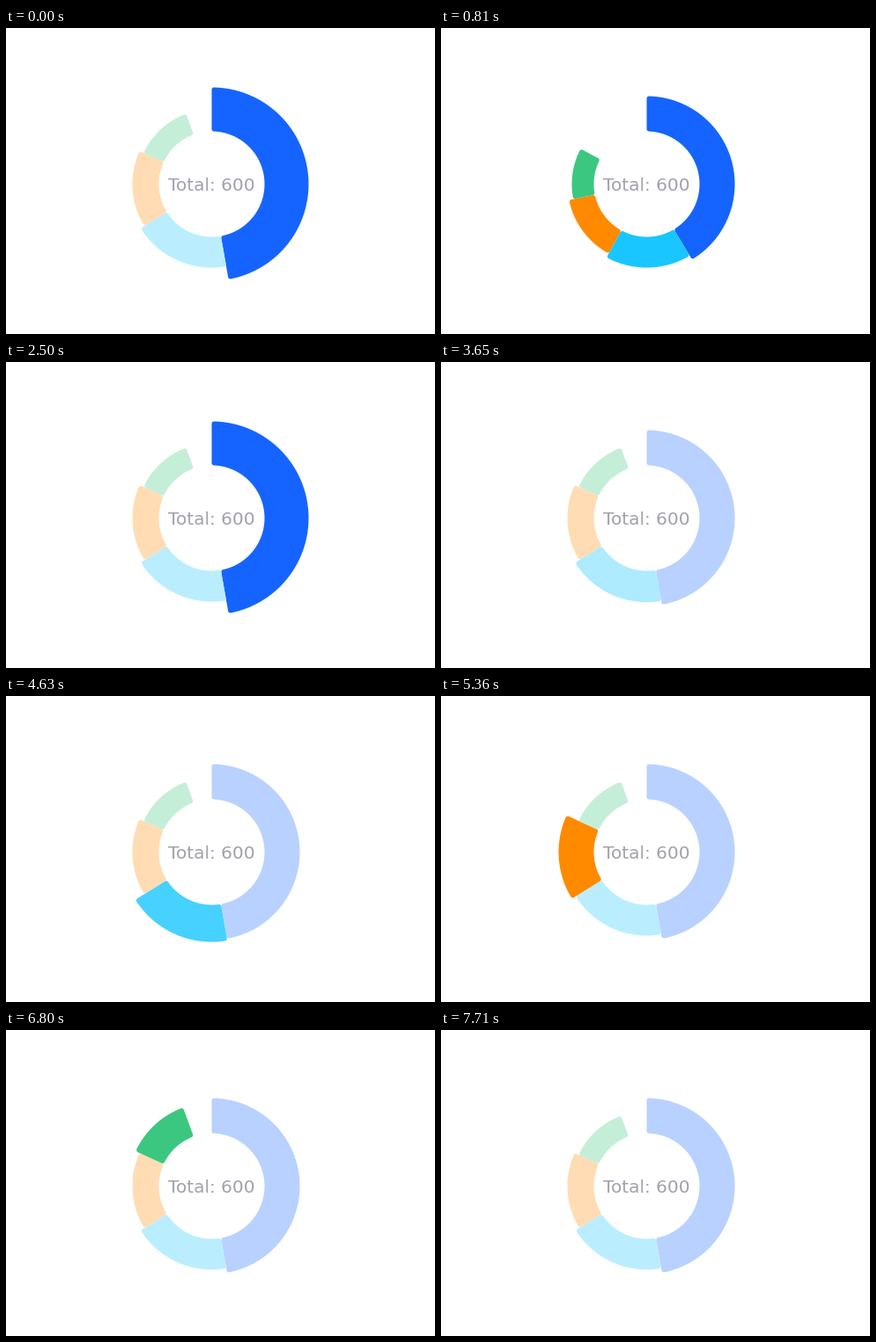
Animation, 487 px wide and 348 px high, one loop 7730 ms. Source, as a matplotlib script:

```python
import numpy as np
import matplotlib.pyplot as plt
from matplotlib.animation import FuncAnimation
from matplotlib.colors import to_rgb
from matplotlib.patches import Polygon

W, H, DPI = 487, 348, 64
LOOP, TICK = 7730, 10
PT = 72 / DPI                      # points per pixel

CX, CY, INNER, CORNER = 233.5, 177.5, 60, 2.5
SPAN, GROW, DIM = 340, 10, 0.3     # degrees, pixels, opacity at rest

CLEAR, TEXT_IN = 60, 300
SWEEP_START, SWEEP_TIME, SWEEP_SHOWN, SWEEP_TICK = 408, 800, 480, 55
FADE_MID, FADE_END = 1270, 1380

# value, outer radius, colour, (start, end, steps) of highlight in and out
SLICES = [
    (300, 100, "#1664FF", (2150, 2500, 7), (3140, 3420, 6)),
    (120, 95, "#1AC6FF", (3590, 3930, 7), (4520, 4850, 7)),
    (100, 90, "#FF8A00", (5020, 5360, 7), (5960, 6290, 7)),
    (80, 85, "#3CC780", (6460, 6800, 7), (7450, 7710, 6)),
]
TOTAL = sum(s[0] for s in SLICES)


def cubic_in_out(x):
    return 4 * x ** 3 if x < 0.5 else 1 - 4 * (1 - x) ** 3


def stepped(t, start, end, steps):
    """Eased progress that moves in a fixed number of visible steps."""
    if t < start:
        return 0.0
    if t >= end:
        return 1.0
    gap = (end - start) / (steps - 1)
    lead = 45
    elapsed = (t - start) // gap * gap + lead
    return cubic_in_out(elapsed / (end - start + lead))


def sweep(t):
    if t < CLEAR:
        return 1.0
    if t < SWEEP_SHOWN:
        return 0.0
    t = SWEEP_SHOWN + (t - SWEEP_SHOWN) // SWEEP_TICK * SWEEP_TICK
    x = min((t - SWEEP_START) / SWEEP_TIME, 1)
    return 1 - (1 - x) ** 3


def rest_opacity(t):
    if t < CLEAR or t >= FADE_END:
        return DIM
    return (1 + DIM) / 2 if t >= FADE_MID else 1.0


def ring_slice(a0, a1, outer):
    """Outline inset by the corner radius; the round stroke fills it out."""
    def arc(radius):
        pad = np.arcsin(CORNER / radius)
        a = np.linspace(np.radians(a0) + pad, np.radians(a1) - pad, 90)
        return np.column_stack([CX + radius * np.sin(a), CY - radius * np.cos(a)])
    return np.vstack([arc(outer - CORNER), arc(INNER + CORNER)[::-1]])


def on_white(color, opacity):
    return tuple(1 - opacity * (1 - c) for c in to_rgb(color))


fig = plt.figure(figsize=(W / DPI, H / DPI), dpi=DPI, facecolor="white")
ax = fig.add_axes([0, 0, 1, 1])
ax.set_xlim(0, W)
ax.set_ylim(H, 0)
ax.axis("off")

patches = []
for _ in SLICES:
    patch = Polygon([(0, 0), (1, 0), (0, 1)], closed=True, joinstyle="round",
                    linewidth=2 * CORNER * PT, snap=False)
    patches.append(ax.add_patch(patch))

label = ax.text(CX, 185, f"Total: {TOTAL}", ha="center", va="baseline",
                family="DejaVu Sans", fontsize=20 * PT, color="#A0A1AD")


def draw(i):
    t = i * TICK
    grown, rest = sweep(t), rest_opacity(t)
    label.set_visible(t < CLEAR or t >= TEXT_IN)
    angle = 0
    for k, (patch, (value, outer, color, enter, leave)) in enumerate(zip(patches, SLICES)):
        lit = stepped(t, *enter) - stepped(t, *leave)
        if t < CLEAR and k == 0:
            lit = 1.0
        end = angle + SPAN * value / TOTAL
        patch.set_visible(grown > 0)
        if grown > 0:
            patch.set_xy(ring_slice(angle * grown, end * grown, outer + GROW * lit))
            patch.set_color(on_white(color, rest + (1 - rest) * lit))
        angle = end
    return [*patches, label]


anim = FuncAnimation(fig, draw, frames=LOOP // TICK, interval=TICK,
                     repeat=True, repeat_delay=0, blit=False)
plt.show()
```
